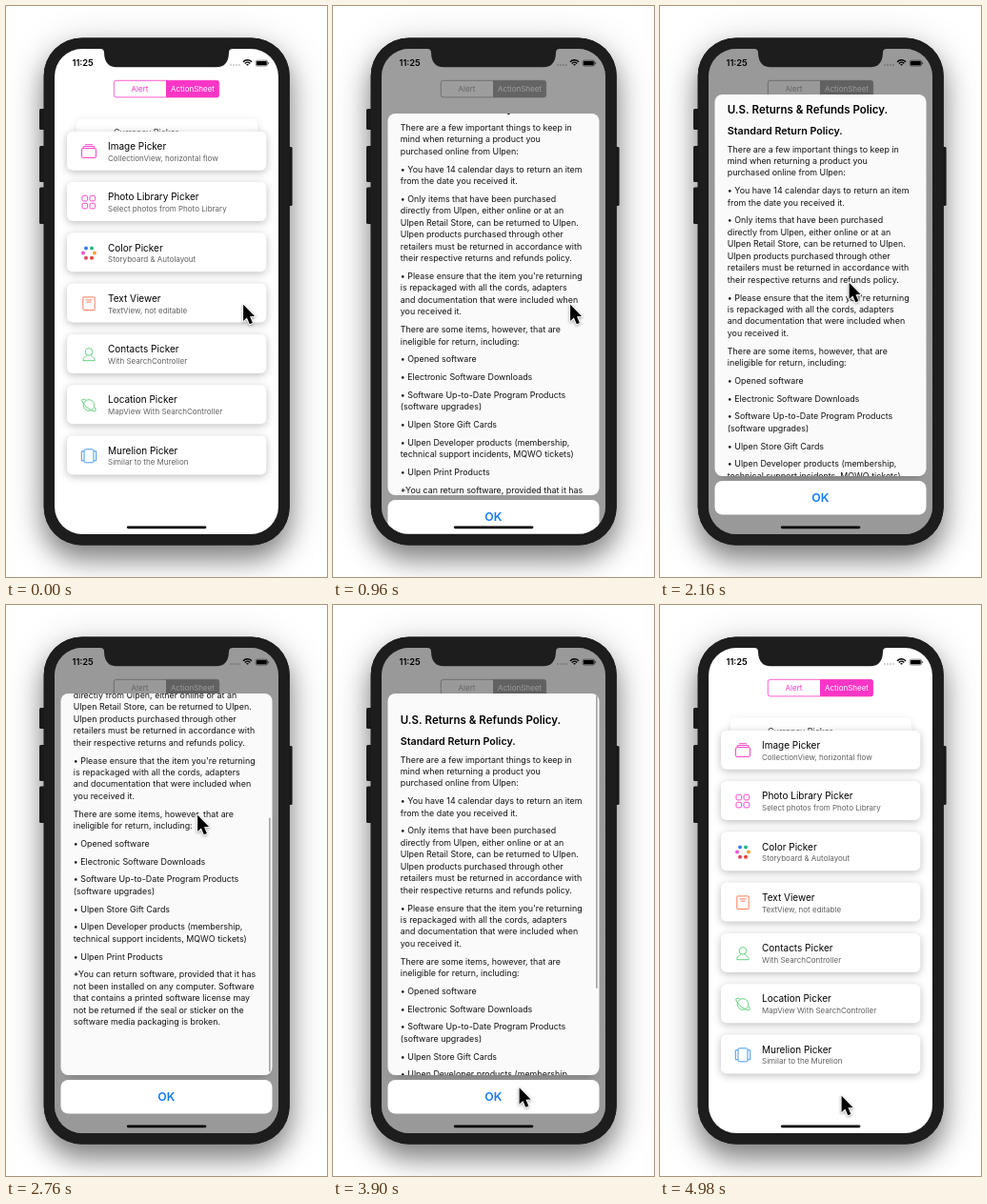
An HTML page with a canvas that plays this animation: 337 by 600 pixels, repeating every 5.52 s.

```html
<!DOCTYPE html>
<html lang="en">
<head>
<meta charset="utf-8">
<title>Text viewer sheet</title>
<style>
html, body { margin: 0; width: 100%; height: 100%; overflow: hidden; background: #fff; }
canvas { display: block; width: 337px; height: 600px; }
</style>
</head>
<body>
<canvas id="stage"></canvas>
<script>
const W = 337, H = 600, LOOP = 5520, TICK = 60;
const FONT = 'Inter, "Noto Sans", sans-serif';
const PINK = '#fb35c6', GREEN = '#56cc74', ORANGE = '#ff6f47', BLUE = '#2f8ef0';
const canvas = document.getElementById('stage');
const ctx = canvas.getContext('2d');
const dpr = window.devicePixelRatio || 1;
canvas.width = W * dpr;
canvas.height = H * dpr;

const PARAGRAPHS = [
  'There are a few important things to keep in\nmind when returning a product you\npurchased online from Ulpen:',
  '• You have 14 calendar days to return an item\nfrom the date you received it.',
  '• Only items that have been purchased\ndirectly from Ulpen, either online or at an\nUlpen Retail Store, can be returned to Ulpen.\nUlpen products purchased through other\nretailers must be returned in accordance with\ntheir respective returns and refunds policy.',
  '• Please ensure that the item you\'re returning\nis repackaged with all the cords, adapters\nand documentation that were included when\nyou received it.',
  'There are some items, however, that are\nineligible for return, including:',
  '• Opened software',
  '• Electronic Software Downloads',
  '• Software Up-to-Date Program Products\n(software upgrades)',
  '• Ulpen Store Gift Cards',
  '• Ulpen Developer products (membership,\ntechnical support incidents, MQWO tickets)',
  '• Ulpen Print Products',
  '*You can return software, provided that it has\nnot been installed on any computer. Software\nthat contains a printed software license may\nnot be returned if the seal or sticker on the\nsoftware media packaging is broken.'
];

// Keyframes: [time, value, ...]
const CURSOR = [
  [0, 248.5, 313], [1560, 248.5, 313], [1860, 203.5, 417], [1980, 203.5, 417],
  [2160, 198, 290], [2580, 200, 216], [2760, 200.5, 220], [3120, 203, 260],
  [3180, 203, 260], [3360, 208.5, 379], [3780, 203, 496], [3900, 195, 506.5], [4200, 190, 515]
];
const SCROLL = [
  [0, 54.5], [1140, 54.5], [1200, 12], [2160, 12], [2340, 80], [2580, 158], [2760, 155],
  [3120, 139], [3180, 139], [3360, 46], [3540, -16], [3780, -4], [3900, 0]
];
const BAR = [[2160, 0], [2280, 1], [3900, 1], [4200, 0]];
const SHEET_STEPS = [
  [0, 500], [660, 430], [780, 140], [960, 20], [1200, 3], [1320, 0],
  [4800, 70], [4860, 260], [4980, 500]
];

function tween(keys, t) {
  const next = keys.findIndex(k => k[0] > t);
  if (next === 0) return keys[0].slice(1);
  if (next < 0) return keys[keys.length - 1].slice(1);
  const a = keys[next - 1], b = keys[next], p = (t - a[0]) / (b[0] - a[0]);
  return a.slice(1).map((v, i) => v + (b[i + 1] - v) * p);
}

const held = (steps, t) => steps.filter(s => s[0] <= t).pop()[1];

function roundPath(x, y, w, h, r) {
  ctx.beginPath();
  ctx.roundRect(x, y, w, h, r);
}

function fillRound(x, y, w, h, r, color) {
  roundPath(x, y, w, h, r);
  ctx.fillStyle = color;
  ctx.fill();
}

function strokeRound(x, y, w, h, r) {
  roundPath(x, y, w, h, r);
  ctx.stroke();
}

function circle(x, y, r) {
  ctx.beginPath();
  ctx.arc(x, y, r, 0, Math.PI * 2);
}

function polyline(...points) {
  ctx.beginPath();
  points.forEach(([x, y]) => ctx.lineTo(x, y));
}

function shadow(color, blur, dy) {
  ctx.shadowColor = color;
  ctx.shadowBlur = blur * dpr;
  ctx.shadowOffsetY = dy * dpr;
}

const noShadow = () => shadow('transparent', 0, 0);

// y is the middle of the capitals
function text(str, x, y, size, color, weight = 400, align = 'left') {
  ctx.font = `${weight} ${size}px ${FONT}`;
  ctx.textAlign = align;
  ctx.fillStyle = color;
  ctx.fillText(str, x, y + size * 0.36);
}

// Icons are drawn around the origin
const icons = {
  stack() {
    strokeRound(-7.5, -3.5, 15, 10, 1.5);
    polyline([-6, -3.5], [-5.5, -5.5], [5.5, -5.5], [6, -3.5]);
    ctx.stroke();
    polyline([-4, -7.3], [4, -7.3]);
    ctx.stroke();
  },
  grid() {
    for (const x of [-7, 1]) for (const y of [-7, 1]) strokeRound(x, y, 5.6, 5.6, 1.5);
  },
  dots() {
    const colors = ['#f5a13a', '#ee3f35', '#e0445c', '#f052cf', '#3d7cf0', '#25b884'];
    colors.forEach((color, i) => {
      const a = i * Math.PI / 3;
      circle(Math.cos(a) * 6, Math.sin(a) * 6, 2);
      ctx.fillStyle = color;
      ctx.fill();
    });
  },
  page() {
    strokeRound(-6.2, -7, 12.4, 13.6, 0.8);
    polyline([-3.5, -4], [3.5, -4]);
    ctx.stroke();
    polyline([-2.3, -1.8], [2.3, -1.8]);
    ctx.stroke();
  },
  person() {
    circle(0, -2.8, 3.8);
    ctx.stroke();
    ctx.beginPath();
    ctx.moveTo(-2.3, 0.5);
    ctx.bezierCurveTo(-2.5, 2.5, -6, 2, -6.2, 6.5);
    ctx.lineTo(6.2, 6.5);
    ctx.bezierCurveTo(6, 2, 2.5, 2.5, 2.3, 0.5);
    ctx.stroke();
  },
  planet() {
    circle(0, 0, 5.8);
    ctx.stroke();
    ctx.beginPath();
    ctx.ellipse(0, 0, 9.2, 3, Math.PI / 4.5, -0.8, Math.PI + 0.8);
    ctx.stroke();
  },
  carousel() {
    strokeRound(-5, -7, 10, 14, 1.5);
    polyline([-5, -5], [-7.7, -5], [-7.7, 5], [-5, 5]);
    ctx.stroke();
    polyline([5, -5], [7.7, -5], [7.7, 5], [5, 5]);
    ctx.stroke();
  }
};

const ROWS = [
  ['Image Picker', 'CollectionView, horizontal flow', 'stack', PINK],
  ['Photo Library Picker', 'Select photos from Photo Library', 'grid', PINK],
  ['Color Picker', 'Storyboard & Autolayout', 'dots', PINK],
  ['Text Viewer', 'TextView, not editable', 'page', ORANGE],
  ['Contacts Picker', 'With SearchController', 'person', GREEN],
  ['Location Picker', 'MapView With SearchController', 'planet', GREEN],
  ['Murelion Picker', 'Similar to the Murelion', 'carousel', BLUE]
];

function listCard(x, y, w, h, strength) {
  shadow(`rgba(0,0,0,${strength})`, 8, 2);
  fillRound(x, y, w, h, 6, '#fff');
  noShadow();
}

function drawList() {
  listCard(74, 118.5, 190, 37, 0.12);
  text('Currency Picker', 113, 133, 9, '#333');
  ROWS.forEach(([title, note, icon, color], i) => {
    const y = 131.7 + i * 53.3;
    listCard(64, y, 209.3, 41, 0.26);
    text(title, 107, y + 15.6, 10, '#000');
    text(note, 107, y + 28.1, 8, '#606060');
    ctx.save();
    ctx.translate(87, y + 21.3);
    ctx.strokeStyle = color;
    ctx.lineWidth = 0.9;
    icons[icon]();
    ctx.restore();
  });
}

function drawSegments(tint) {
  fillRound(168, 78.3, 55.7, 17.6, [0, 2.5, 2.5, 0], tint);
  ctx.strokeStyle = tint;
  ctx.lineWidth = 0.8;
  strokeRound(113.3, 78.3, 110.4, 17.6, 2.5);
  text('Alert', 140.5, 87, 8, tint, 400, 'center');
  text('ActionSheet', 196, 87, 8, '#fff', 400, 'center');
}

function drawStatus() {
  text('11:25', 69.5, 60, 9.3, '#000', 600);
  ctx.fillStyle = 'rgba(0,0,0,.25)';
  for (let i = 0; i < 4; i++) {
    circle(236 + i * 3, 62, 0.9);
    ctx.fill();
  }
  ctx.strokeStyle = '#000';
  ctx.lineWidth = 1.4;
  for (const r of [6.2, 3.8, 1.3]) {
    ctx.beginPath();
    ctx.arc(253.5, 63, r, -Math.PI * 0.76, -Math.PI * 0.24);
    ctx.stroke();
  }
  ctx.lineWidth = 0.5;
  strokeRound(262.2, 57.2, 12.4, 5.8, 1.6);
  fillRound(263, 58, 10.8, 4.2, 0.9, '#000');
  fillRound(275.2, 59, 0.9, 2.2, 0.4, '#555');
}

function drawPolicy(top) {
  const line = 12.47, gap = 6.28;
  text('U.S. Returns & Refunds Policy.', 70.8, top + 28, 11.5, '#000', 600);
  text('Standard Return Policy.', 70.8, top + 49.7, 10.7, '#000', 600);
  let y = top + 69.3;
  for (const paragraph of PARAGRAPHS) {
    for (const str of paragraph.split('\n')) {
      text(str, 70.8, y, 8.9, '#111');
      y += line;
    }
    y += gap;
  }
}

function drawBar(scroll, alpha) {
  const first = 95, last = 490.5, range = 114, full = 308;
  const length = full - Math.max(0, -scroll, scroll - range);
  const inside = Math.min(range, Math.max(0, scroll));
  const y = scroll > range ? last - length : first + inside * (last - first - full) / range;
  fillRound(276, y, 1.7, length, 0.8, `rgba(0,0,0,${0.34 * alpha})`);
}

function drawSheet(t, offset) {
  const scroll = tween(SCROLL, t)[0];
  ctx.save();
  ctx.translate(0, offset);
  ctx.save();
  roundPath(57.5, 93, 222, 401, 8);
  ctx.clip();
  ctx.fillStyle = '#fafafa';
  ctx.fillRect(57, 92, 224, 403);
  drawPolicy(93 - scroll);
  drawBar(scroll, tween(BAR, t)[0]);
  ctx.restore();
  const pressed = t >= 4620 && t < 4800;
  fillRound(57.5, 499, 222, 35.5, 8, pressed ? '#e4e4e4' : '#fff');
  text('OK', 168.3, 516.8, 12.3, '#127bf5', 600, 'center');
  ctx.restore();
}

function drawBody() {
  const metal = '#242424';
  const shell = () => fillRound(39.7, 33.4, 258, 533.2, 40, '#1d1d1d');
  fillRound(35, 108, 7, 22, 1.5, metal);
  fillRound(35, 147, 7, 38, 1.5, metal);
  fillRound(35, 190.5, 7, 38.5, 1.5, metal);
  fillRound(295, 148, 5.6, 62, 1.5, metal);
  shadow('rgba(0,0,0,.2)', 44, 8);
  shell();
  shadow('rgba(0,0,0,.4)', 26, 15);
  shell();
  noShadow();
}

function drawNotch() {
  ctx.fillStyle = '#1d1d1d';
  ctx.beginPath();
  ctx.moveTo(99, 44);
  ctx.lineTo(99, 45);
  ctx.quadraticCurveTo(103, 45, 103, 49);
  ctx.quadraticCurveTo(103.5, 64.3, 116, 64.3);
  ctx.lineTo(221, 64.3);
  ctx.quadraticCurveTo(233.5, 64.3, 234, 49);
  ctx.quadraticCurveTo(234, 45, 238, 45);
  ctx.lineTo(238, 44);
  ctx.fill();
}

function drawCursor([x, y]) {
  ctx.save();
  ctx.translate(x, y);
  polyline([0.6, 0.8], [0.6, 18], [4.4, 14.5], [7.3, 21.3], [10.4, 20], [7.5, 13.2], [12.6, 13]);
  ctx.closePath();
  ctx.lineJoin = 'round';
  ctx.lineWidth = 1.8;
  ctx.strokeStyle = '#fff';
  shadow('rgba(0,0,0,.4)', 3, 1);
  ctx.stroke();
  noShadow();
  ctx.fillStyle = '#000';
  ctx.fill();
  ctx.restore();
}

function draw(t) {
  const offset = held(SHEET_STEPS, t);
  const open = offset < 500;
  ctx.setTransform(dpr, 0, 0, dpr, 0, 0);
  ctx.fillStyle = '#fff';
  ctx.fillRect(0, 0, W, H);
  drawBody();

  ctx.save();
  roundPath(51, 45, 235, 510, 29);
  ctx.clip();
  ctx.fillStyle = '#fff';
  ctx.fillRect(51, 45, 236, 511);
  drawSegments(open ? '#a2a2a2' : PINK);
  drawList();
  drawStatus();
  if (open) {
    ctx.fillStyle = `rgba(0,0,0,${0.4 * (1 - offset / 500)})`;
    ctx.fillRect(51, 45, 236, 511);
    drawSheet(t, offset);
  }
  fillRound(126.8, 546.4, 83.6, 2.9, 1.45, '#000');
  ctx.restore();

  drawNotch();
  drawCursor(tween(CURSOR, t));
}

function loop() {
  const t = performance.now() % LOOP;
  draw(Math.floor(t / TICK) * TICK);
  requestAnimationFrame(loop);
}
loop();
</script>
</body>
</html>
```
